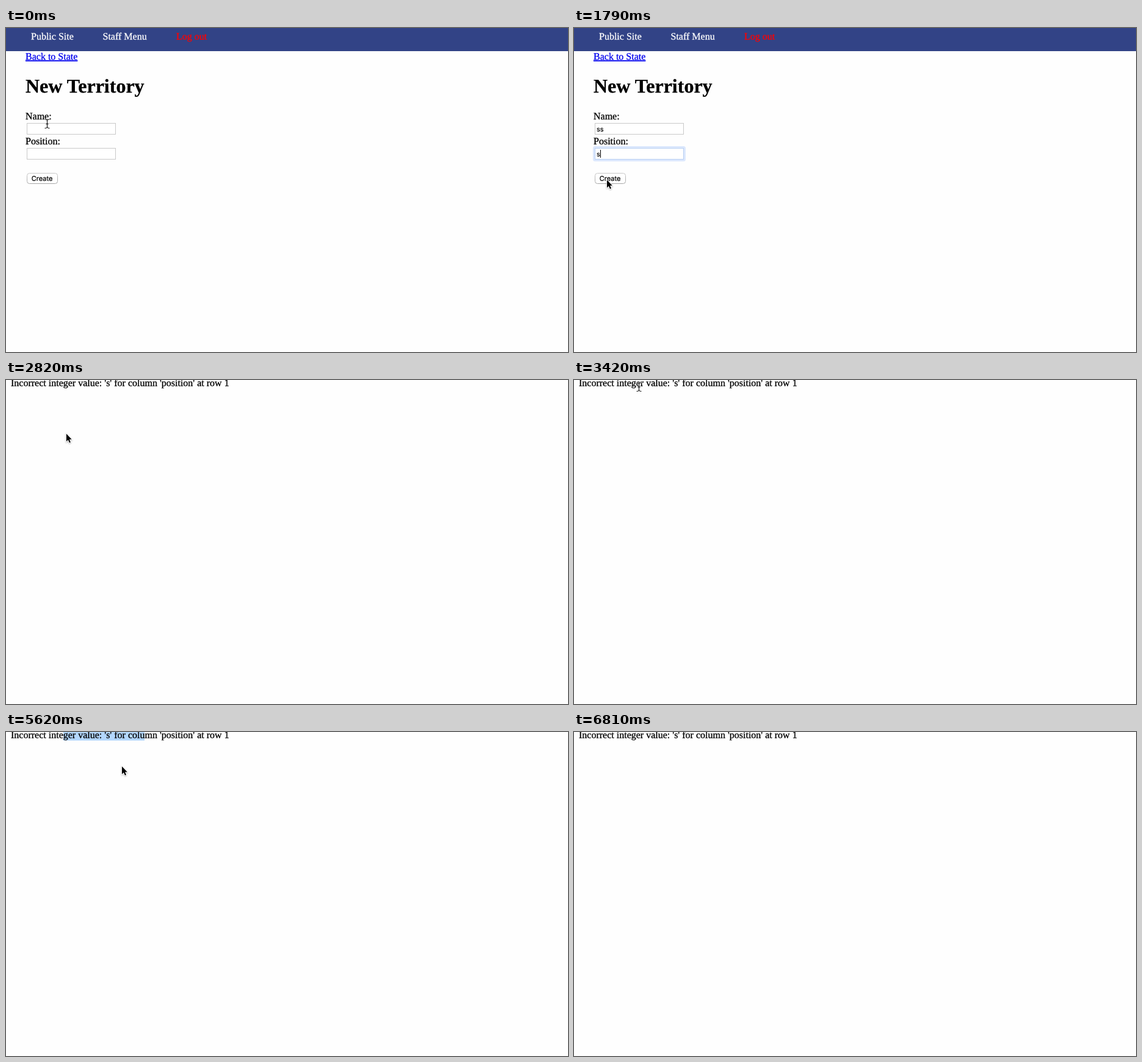
An HTML page that plays this animation: 921x532 px, repeating every 8 s.

```html
<!DOCTYPE html>
<html lang="en">
<head>
<meta charset="utf-8">
<title>New Territory</title>
<style>
  html, body { margin: 0; width: 100%; height: 100%; overflow: hidden; background: #fefefe; }
  svg { display: block; width: 921px; height: 532px; }
  text {
    font: 16px "Liberation Serif", Times, serif;
    fill: currentColor; stroke: currentColor; stroke-width: .3;
    text-rendering: geometricPrecision;
  }
  .title { font-size: 32px; font-weight: bold; }
  .ui { font: 11px Inter, "Liberation Sans", sans-serif; stroke-width: .2; }
  .link { color: #00e; text-decoration: underline; }
  .box { fill: #fff; stroke: #c9c9c9; }
  .ring { fill: none; stroke: #dce8fd; stroke-width: 3; }
</style>
</head>
<body>
<svg viewBox="0 0 921 532">
  <defs>
    <linearGradient id="edge" x2="0" y2="1">
      <stop stop-color="#c8c8c8"/><stop offset="1" stop-color="#a6a6a6"/>
    </linearGradient>
    <filter id="shadow" x="-50%" y="-50%" width="200%" height="200%">
      <feDropShadow dx="0" dy="1" stdDeviation="1" flood-opacity=".35"/>
    </filter>
    <path id="beam" d="M-3 -7Q-.3 -7 .5 -5.5Q1.3 -7 4 -7M.5 -5.5V6M-3 7.5Q-.3 7.5 .5 6Q1.3 7.5 4 7.5M-1.2 .5H2.2"/>
  </defs>
  <rect width="921" height="532" fill="#fefefe"/>

  <g id="form">
    <rect width="921" height="38" fill="#324386"/>
    <text x="41" y="19" color="#fff">Public Site</text>
    <text x="158.5" y="19" color="#fff">Staff Menu</text>
    <text x="279" y="19" color="#f00">Log out</text>
    <text x="32" y="52" class="link">Back to State</text>
    <text x="32" y="106" class="title">New Territory</text>
    <text x="32" y="150">Name:</text>
    <text x="32" y="191">Position:</text>
    <rect class="box" x="34.5" y="156.5" width="145" height="18"/>
    <rect class="box" x="34.5" y="197.5" width="145" height="18"/>
    <g id="focus">
      <rect class="ring" x="32.5" y="154.5" width="149" height="22" rx="2"/>
      <rect class="box" x="34.5" y="156.5" width="145" height="18" style="stroke:#b8cff3"/>
      <rect id="caret" y="159" width="1" height="13"/>
    </g>
    <text id="name" class="ui" x="37" y="170"></text>
    <text id="position" class="ui" x="37" y="211"></text>
    <rect x="34.5" y="238.5" width="50" height="17" rx="4" fill="#fff" stroke="url(#edge)"/>
    <text class="ui" x="41.8" y="251">Create</text>
  </g>

  <g id="error">
    <rect id="selection" x="94" height="14" fill="#b3d7fe"/>
    <text x="8" y="10">Incorrect integer value: 's' for column 'position' at row 1</text>
  </g>

  <g id="ibeam" fill="none" stroke-linecap="round">
    <use href="#beam" stroke="#fff" stroke-opacity=".75" stroke-width="2.6"/>
    <use href="#beam" stroke="#000" stroke-width="1.1"/>
  </g>
  <path id="arrow" d="M0 .5V13.2L2.9 10.4L5 15.2L7 14.3L5 9.7H8.8Z" stroke="#fff" stroke-width="1.6" paint-order="stroke" filter="url(#shadow)"/>
</svg>
<script>
const LOOP = 8000;
const STEP = 147.8;
const $ = id => document.getElementById(id);

// Where the pointer turns or rests: step, x, y
const stops = [
  [0, 67, 157], [2, 68, 168], [4, 68, 168], [6, 60, 206], [10, 60, 206],
  [12, 54, 249], [14, 54, 249], [21, 110, 48], [23, 106, 11], [27, 88, 10],
  [29, 93, 10], [30, 153, 10], [33, 227, 13], [38, 190, 56],
  [41, 279, 32], [45, 127, -15], [46, 127, -40]
];

const clamp = v => Math.min(1, Math.max(0, v));
const ease = v => v * v * (3 - 2 * v);
const mix = (a, b, v) => a + (b - a) * v;
const show = (id, on) => $(id).setAttribute("display", on ? "inline" : "none");
const move = (id, x, y) => $(id).setAttribute("transform", `translate(${x} ${y})`);
const typed = (text, from, step) => text.slice(0, Math.max(0, step - from + 1));

function pointerAt(step) {
  const next = stops.findIndex(stop => stop[0] > step);
  if (next < 0) return stops.at(-1).slice(1);
  const [s0, x0, y0] = stops[next - 1];
  const [s1, x1, y1] = stops[next];
  const v = ease((step - s0) / (s1 - s0));
  return [mix(x0, x1, v), mix(y0, y1, v)];
}

function drawForm(step) {
  const name = typed("ss", 4, step);
  const position = typed("s", 9, step);
  const second = step >= 8;
  $("name").textContent = name;
  $("position").textContent = position;
  show("focus", step >= 2);
  move("focus", 0, second ? 41 : 0);
  $("caret").setAttribute("x", 37 + 6 * (second ? position : name).length);
}

function drawSelection(step) {
  const on = step >= 30 && step < 42;
  $("selection").setAttribute("width", on ? mix(44, 133, ease(clamp((step - 30) / 3))) : 0);
}

function draw(t) {
  const step = Math.floor(t / STEP);
  const failed = step >= 14;
  show("form", !failed);
  show("error", failed);
  drawForm(step);
  drawSelection(step);

  const [x, y] = pointerAt(step);
  const pointing = y < 0 || y > (failed ? 16 : 220);
  show("arrow", pointing);
  show("ibeam", !pointing);
  move(pointing ? "arrow" : "ibeam", x, y);
}

const start = performance.now();
function tick(now) {
  draw(Math.max(0, now - start) % LOOP);
  requestAnimationFrame(tick);
}
draw(0);
requestAnimationFrame(tick);
</script>
</body>
</html>
```
